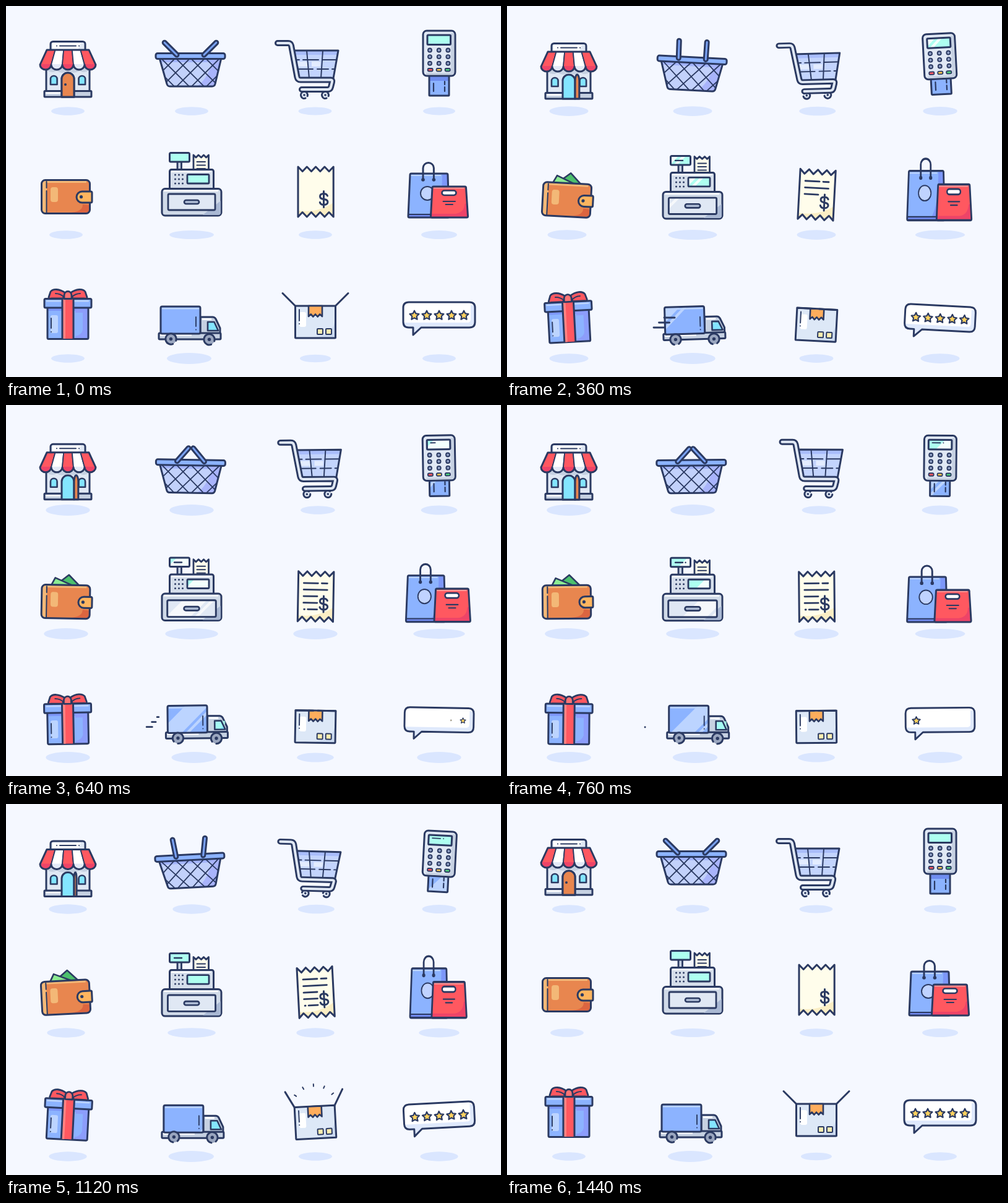
An HTML page with a canvas for the animation above (1480 ms loop, 800 by 600 pixels).

```html
<!DOCTYPE html>
<html lang="en">
<head>
<meta charset="utf-8">
<title>Shopping icons</title>
<style>
html, body { margin: 0; width: 100%; height: 100%; overflow: hidden; background: #f5f8ff; }
canvas { display: block; }
</style>
</head>
<body>
<canvas id="stage" width="800" height="600"></canvas>
<script>
const c = document.getElementById('stage').getContext('2d');
const LOOP = 1480, STEP = 40, CYCLE = 1440;
const INK = '#2b3a62', BLUE = '#8cb3ff', DEEP = '#7d97f8', PALE = '#bcd4ff', RED = '#ff5860',
  ROSE = '#ee4468', GREY = '#e0e8f4', STEEL = '#c6d1e2', MINT = '#aefff0', CYAN = '#84e5ff',
  ORANGE = '#e8864f', TAN = '#f3b877', CREAM = '#fffdeb', WHITE = '#ffffff';

let t = 0, u = 0, s = 0; // time, float 0..1..0, sway -1..1

const ease = k => (1 - Math.cos(Math.PI * Math.min(1, Math.max(0, k)))) / 2;

// Eased value from a flat list: time, value, time, value...
function key(list, at = t) {
  for (let i = 0; i < list.length - 2; i += 2) {
    if (at < list[i + 2]) {
      return list[i + 1] + (list[i + 3] - list[i + 1]) * ease((at - list[i]) / (list[i + 2] - list[i]));
    }
  }
  return list[list.length - 1];
}

function paint(path, fill, width = 3) {
  if (fill) { c.fillStyle = fill; c.fill(path); }
  if (width) { c.lineWidth = width; c.strokeStyle = INK; c.stroke(path); }
}
const shape = (d, fill, width) => paint(new Path2D(d), fill, width);

function box(x, y, w, h, r, fill, width) {
  const p = new Path2D();
  p.roundRect(x, y, w, h, r);
  paint(p, fill, width);
}

function dot(x, y, r, fill = INK, width = 0) {
  const p = new Path2D();
  p.arc(x, y, r, 0, 7);
  paint(p, fill, width);
}

function pose(x, y, dx, dy, degrees, draw, sx = 1, sy = sx) {
  c.save();
  c.translate(x + dx, y + dy);
  c.rotate(degrees * Math.PI / 180);
  c.scale(sx, sy);
  c.translate(-x, -y);
  draw();
  c.restore();
}

function clipped(d, draw) {
  c.save();
  c.clip(new Path2D(d));
  draw();
  c.restore();
}

function shadow(x, y, w, h) {
  c.fillStyle = '#dae6ff';
  c.beginPath();
  c.ellipse(x, y, w / 2, h / 2, 0, 0, 7);
  c.fill();
}

const softShadow = (x, y) => shadow(x, y, 54 + 18 * u, 13.5 + 4.5 * u);

// Slanted light passing over a rectangle
function sheen(x, y, w, h, lead, color) {
  clipped(`M${x} ${y}h${w}v${h}h${-w}z`, () => {
    for (const [a, b] of [[-38, 0], [6, 12]]) {
      shape(`M${x + lead + a} ${y}H${x + lead + b}l${-h} ${h}h${a - b}z`, color, 0);
    }
  });
}

function tube(d, fill, outer) {
  const p = new Path2D(d);
  paint(p, null, outer);
  c.strokeStyle = fill;
  c.lineWidth = outer - 6;
  c.stroke(p);
}

function wheel(x, y, r, fill, spin, hub) {
  dot(x, y, r, fill);
  const p = new Path2D();
  p.arc(x, y, r, spin + 1.2, spin + 6.6);
  paint(p);
  dot(x, y, hub);
}

function store() {
  softShadow(100, 170);
  pose(100, 100, 0, 6 * u, 0, () => {
    box(72, 57.5, 56, 16, 4, GREY);
    shape('M75 60H121L117 69H75z', WHITE, 0);
    shape('M82 64.5h.1M87 64.5H113M118 64.5h.1', null, 2);
    shape('M65 92H135V138H65z', GREY);
    shape('M66.500 96H133.500V104Q127 110 119 105Q109 111 100 105Q91 111 82 105Q73 110 66.500 104z', STEEL, 0);
    box(62, 137.5, 76, 9.5, 1, STEEL);
    shape('M64 139.500H90V142H64z', WHITE, 0);
    for (const x of [72, 117.5]) shape(`M${x} 127v-9a5.300 5 0 0 1 10.600 0v9z`, CYAN, 2.6);
    const arch = (x, w, fill) => shape(`M${x} 147V118a${w / 2} 10 0 0 1 ${w} 0V147z`, fill);
    arch(90, 20, CYAN);
    const w = 20 * Math.cos(key([0, 0, 300, 110, 1060, 110, 1400, 0]) * Math.PI / 180);
    arch(Math.min(110, 110 - w), Math.abs(w), ORANGE);
    if (w > 14) dot(116 - w, 127, 2);
    for (let i = 0; i < 5; i++) {
      const top = 66 + 13.6 * i, low = 55 + 18 * i;
      const stripe = `M${top} 71L${low} 95a9 8 0 0 0 18 0L${top + 13.6} 71z`;
      shape(stripe, i % 2 ? WHITE : RED, 0);
      clipped(stripe, () => shape(`M${low} 94h18v12h-18z`, i % 2 ? '#e3eaf7' : ROSE, 0));
      shape(stripe, null, 1.8);
    }
    shape('M66 71H134L145 95' + 'a9 8 0 0 1 -18 0'.repeat(5) + 'z');
  });
}

function basket() {
  softShadow(300, 170);
  const tilt = -45 + 88 * u;
  pose(298, 103, 0, 12.5 * u, 3 * s, () => {
    const body = 'M248 84H348L338 126Q337 130 333 130H265Q261 130 260 126z';
    shape(body, '#c2d1fb', 0);
    clipped(body, () => {
      shape('M240 80H356V91H240z', '#a3b4fb', 0);
      shape('M334 84H350L336 132H306Q328 118 334 84z', '#a9b4fb', 0);
      for (let x = 202; x < 400; x += 24) shape(`M${x} 84l48 48M${x} 84l-48 48`, null, 1.8);
    });
    shape(body);
    box(242, 76.5, 112, 9, 3, BLUE);
    for (const side of [-1, 1]) {
      pose(298 + 22 * side, 79, 0, 0, -side * tilt, () => tube(`M${298 + 22 * side} 79v-28`, '#7ba3f6', 9));
    }
  });
}

function cart() {
  const swing = Math.abs(s), dx = 5.2 * u, dip = s * s;
  shadow(499.5 + 4.5 * u, 170, 54 + 5 * swing, 13 + 1.5 * swing);
  pose(490, 140, dx * .85, .6 * swing, -1.5 * s, () => {
    wheel(482, 144, 5.5, GREY, dx, 1.8);
    wheel(516, 144, 5.5, GREY, dx, 1.8);
  });
  pose(500, 140, dx, 2.2 * dip, -1.6 * s, () => {
    const body = 'M463 72H537L529 117H471z';
    shape(body, '#c3d4fd', 0);
    clipped(body, () => {
      shape('M463 72H537V79H463z', '#a9bdfb', 0);
      shape('M470 90h18v8h-18zM494 90h14v8h-14z', '#e3ecff', 0);
      shape('M460 87H474M480 87H505M511 87H540M460 102H496M503 102H521M527 102H540', null, 2);
      shape('M486 72L490 117M512 72L509 117', null, 2);
    });
    shape(body);
    const grip = 60 - 3 * dip;
    tube(`M439 ${grip}H456Q460 ${grip} 461 ${grip + 4}L470.5 115Q471.5 119.5 476 119.5H525Q528 119.5 527 123L525 131Q524 135 520 135H478`, GREY, 10);
  }, 1, 1 - .04 * dip);
}

function terminal() {
  shadow(700, 170, 52 + 7 * u, 13 + 2 * u);
  const slide = key([0, 0, 280, 7, 1120, 7, 1420, 0]);
  pose(700, 92, 0, 9.5 * u, -3 * s, () => {
    pose(700, 130, 0, -slide, 0, () => {
      shape('M684 100H716V145H684z', BLUE, 0);
      shape('M684 112H716V121H684z', '#6f8df0', 0);
      sheen(684, 110, 32, 35, (t - 560) * .125, PALE);
      box(684, 100, 32, 45, 1);
      shape('M691 125V138M709 122V127M709 131V138', null, 2.2);
    });
    box(674, 40, 52, 73, 6, GREY);
    shape('M719 44H724V108Q724 111 720 111H679V108H716Q719 108 719 104z', STEEL, 0);
    shape('M681 47H718.500V62.500H681z', MINT, 0);
    sheen(681, 47, 37.5, 15.5, (t - 260) * .13, 'rgba(255,255,255,.85)');
    box(681, 47, 37.5, 15.5, 1.5);
    const typed = key([560, 0, 740, 18, 1140, 18, 1340, 0]);
    if (typed > 1) shape(`M687 51.800h${Math.min(13, typed)}${typed > 17 ? 'M705 51.800h.1' : ''}`, null, 1.8);
    for (let i = 0; i < 9; i++) dot(685 + 14.7 * (i % 3), 71.5 + 10.6 * Math.floor(i / 3), 3, '#8f9fc4', 1.9);
    [RED, '#ffc94f', '#4fcf7c'].forEach((f, i) => box(681.7 + 14 * i, 101, 8, 4.5, 1.5, f, 1.9));
  });
}

function wallet() {
  softShadow(97, 370);
  const rise = key([0, 0, 300, 20, 1120, 20, 1420, 0]);
  pose(97, 309, 0, 10 * u, 3 * s, () => {
    if (rise > 1) pose(97, 300, 0, 21 - rise, 0, () => {
      shape('M86 276L101 264L121 284L115 300H90z', '#4cc06d', 2.6);
      shape('M68 290L79 269L119 286L112 300H70z', '#8ceb92', 2.6);
    });
    box(57.5, 281.5, 78, 54, 6, ORANGE, 0);
    shape('M134 322V331Q134 334 131 334H100Q124 334 124 321z', '#dc6540', 0);
    box(58, 282, 8, 53, 4, TAN, 0);
    shape('M64 283H130V286H64z', TAN, 0);
    box(72, 293, 12, 24, 4, TAN, 0);
    shape('M65.500 284V294M65.500 299V334', null, 2);
    box(57.5, 281.5, 78, 54, 6);
    const x = 114 + 3 * u;
    box(x, 300, 139 - x, 18, [9, 2, 2, 9], '#fdb55f');
    dot(x + 7.5, 308.7, 2.6);
  });
}

function register() {
  shadow(300, 370, 72 + 14 * u, 14 + 4 * u);
  const lead = (t - 260) * .13, glow = 'rgba(255,255,255,.85)';
  pose(300, 290, 0, 9.8 * u, 0, () => {
    const top = 265 - 24 - 2.5 * s;
    clipped('M295 230H340V264H295z', () => {
      shape(`M303 270V${top}l4 4 4 -4 4.500 4 4 -4 4 4 4 -4V270z`, CREAM, 2.8);
      shape([11, 16.5, 22].map(d => `M308.500 ${top + d}H322`).join(''), null, 2);
    });
    box(277, 250, 6.5, 16, 0, STEEL, 2.8);
    box(264.5, 237.5, 32, 14.5, 2, MINT, 0);
    sheen(264.5, 237.5, 32, 14.5, lead, glow);
    box(264.5, 237.5, 32, 14.5, 2);
    const typed = key([160, 0, 340, 12, 560, 12, 740, 18, 960, 12, 1140, 12, 1340, 0]);
    if (typed > 1) shape(`M272 245h${Math.min(12, typed)}${typed > 15 ? 'M288.500 245h.1' : ''}`, null, 2.4);
    box(264.5, 264.5, 71, 34, 3, '#d5deeb');
    shape('M267 267H331V269H267z', WHITE, 0);
    for (let i = 0; i < 9; i++) dot(273.5 + 6 * (i % 3), 273 + 7 * Math.floor(i / 3), 1.5);
    box(293, 272.5, 35, 14.5, 1.5, MINT, 0);
    sheen(293, 272.5, 35, 14.5, lead, glow);
    box(293, 272.5, 35, 14.5, 1.5, null, 2.8);
    box(252, 295.5, 96, 43.5, 5, '#d0dae8');
    shape('M347 315V334Q347 338 343 338H318z', '#a9b8d3', 0);
    shape('M255 298H343V300H255z', WHITE, 0);
    // The drawer slides towards the viewer
    pose(300, 317, 0, 2.8 * u, 0, () => {
      box(262, 304, 76, 26, 2, GREY, 0);
      sheen(262, 304, 76, 26, (t - 330) * .2, 'rgba(255,255,255,.7)');
      box(262, 304, 76, 26, 2, null, 2.8);
      box(288, 314, 24, 6, 3, '#aebcd5', 2.6);
    }, 1 + .035 * u);
  });
}

function receipt() {
  softShadow(500, 370);
  const rows = [[[481, 504], [510, 519]], [[481, 519]], [[481, 503]], [[481, 503]], [[482, 483], [488, 503]]];
  const written = t < 1160 ? (t - 140) / 84 : 5 * (1 - (t - 1160) / 240);
  pose(500.5, 300, 0, 9.5 * u, 3 * s, () => {
    const zig = 'l7.200 7.500 7.100 -7.500'.repeat(4);
    const zag = 'l-7.200 -7.500 -7.100 7.500'.repeat(4);
    const paper = `M472 260${zig}V341${zag}z`;
    shape(paper, CREAM, 0);
    clipped(paper, () => shape('M472 331Q505 335 529 318V342H472z', '#fbeec4', 0));
    shape(paper);
    rows.forEach((row, i) => {
      const end = 481 + 38 * (written - i);
      for (const [a, b] of row) if (end > a) shape(`M${a} ${279 + 10.6 * i}H${Math.min(b, end)}`, null, 2.8);
    });
    shape('M519.500 307C518.500 304.500 516.500 303.500 513.500 303.500C510 303.500 507.500 305 507.500 308C507.500 315 520 310 520 317C520 320 517 321.500 513.500 321.500C510 321.500 508 320 507.300 317.500M513.500 299.500V325.500', null, 3);
  });
}

function bags() {
  const stretch = Math.min(1, 1.3 * Math.abs(s)), base = 342 + 9 * u;
  const apart = key([0, 0, 360, 6, 520, 5.5, 760, 4, 960, -.5, CYCLE, 0]);
  shadow(700, 370, key([0, 58, 480, 84, 560, 84, CYCLE, 58]), 14 + 2 * u);
  pose(0, 0, 683 - apart, base, 0, () => {
    const bag = 'M-28 -71H29Q31 -71 31 -69L33 -2Q33 0 31 0H-31Q-33 0 -33 -2L-30 -69Q-30 -71 -28 -71z';
    shape(bag, BLUE, 0);
    clipped(bag, () => {
      shape('M4 0Q22 -10 22 -71H34V0z', DEEP, 0);
      shape('M-34 -5H34V1H-34z', '#7089ee', 0);
      shape('M-29 -69H20V-67H-29z', PALE, 0);
      shape('M-33 -5H33', null, 1.8);
    });
    shape(bag);
    dot(-2, -39, 11, '#c0d3ff', 1.9);
    shape('M-9 -61V-80a8.700 8.500 0 0 1 17.400 0V-61');
    dot(-9, -61, 2.8);
    dot(8.4, -61, 2.8);
  }, 1 - .08 * stretch, 1 + .125 * stretch);
  pose(0, 0, 716.5 + apart, base, 0, () => {
    const bag = 'M-25.500 -50H25Q27 -50 27 -48L30 -2Q30 0 28 0H-28Q-30 0 -30 -2L-27.500 -48Q-27.500 -50 -25.500 -50z';
    shape(bag, RED, 0);
    clipped(bag, () => {
      shape('M-30 -6H10Q24 -8 25 -22L32 -24V0H-30z', ROSE, 0);
      shape('M-26 -48.500H24V-46.500H-26z', '#ff9a98', 0);
    });
    shape(bag);
    box(-12, -43.5, 23, 7.5, 3.7, WHITE, 2.6);
    shape('M-10 -26H9.500M-6 -21H5.500', null, 1.9);
  }, 1 - .06 * stretch, 1 + .16 * stretch);
}

function gift() {
  softShadow(100, 570);
  pose(100, 503, 0, 10 * u, -3 * s, () => {
    shape('M67 487H133V538.500H67z', BLUE, 0);
    shape('M68 488H132V493H68z', DEEP, 0);
    shape('M112 538V490H132V538z', '#8c9dfb', 0);
    shape('M112 496H124V524Q122 532 112 534z', BLUE, 0);
    box(72, 500, 12, 29, 3, PALE, 0);
    box(67, 487, 66, 51.5, 2);
    shape('M73 505V521M73 527h.1', null, 1.9);
    box(62, 473.5, 76, 14.5, 2, BLUE);
    shape('M65 476H134V478.500H65z', PALE, 0);
    shape('M91 474H109V538H91z', RED, 0);
    shape('M91 474H96V538H91z', '#ff8583', 0);
    shape('M91 474V538M109 474V538');
    for (const side of [1, -1]) {
      pose(100, 466, 0, 0, 0, () => {
        shape('M96 464C86 457 76 457 72 462L69 471Q69 474 73 473H92z', RED, 2.8);
        shape('M80 465Q88 465 94 471', null, 2);
      }, side, 1);
    }
    shape('M94 473.500V468a6 6.500 0 0 1 12 0V473.500z', '#ff7474', 2.8);
  });
}

function truck() {
  const dx = 11.8 * u, lean = Math.max(0, s), sink = 1.3 * Math.max(0, -s);
  shadow(296 + 8 * u, 570, 72 + 1.5 * Math.abs(s), 18);
  pose(297, 535, dx, sink, -1.7 * lean, () => {
    shape('M314 503H334Q337 503 339 506L346 521V538H314z', STEEL);
    shape('M317 505H332V508H317z', WHITE, 0);
    shape('M326 511H336.500L343 525H326z', CYAN, 0);
    sheen(326, 511, 17, 14, (t - 420) * .1, 'rgba(174,255,240,.8)');
    shape('M326 511H336.500L343 525H326z', null, 2.6);
    box(247, 529, 100, 10, 1.5, STEEL);
    shape('M249 531H300V533.500H249z', WHITE, 0);
    box(250, 486, 64, 44, 2.5, BLUE, 0);
    shape('M252 488H312V490.500H252z', PALE, 0);
    sheen(250, 486, 64, 44, (t - 195) * .15, PALE);
    box(250, 486, 64, 44, 2.5);
    shape('M307 503V518M307 523.500h.1', null, 1.9);
  });
  pose(297, 535, dx, 0, -1.7 * lean, () => {
    wheel(266.5, 538.5, 8.7, '#9aa6bf', dx / 9, 2.7);
    wheel(328.5, 539.3, 8.7, '#9aa6bf', dx / 9, 2.7);
  });
  for (let i = 0; i < 3; i++) {
    const length = key([160, 0, 340, 17, 520, 17, 680 + 45 * i, 0]);
    const x = 254 - 8.5 * i - (t - 360) * .035;
    if (t > 160 && t < 730 + 25 * i) shape(`M${x} ${505 + 8 * i - lean}h${length + .1}`, null, 2.8);
  }
}

function parcel() {
  shadow(500, 570, 50 + 10 * u, 12.5 + 2.5 * u);
  const flap = key([0, -45, 320, 90, 780, 90, 1220, -45]);
  pose(500, 511, 0, 9.5 * u, 3 * s, () => {
    shape('M467.500 485H532.500V537H467.500z', '#dde8f7', 0);
    shape('M531 512V536H490Q526 536 531 512z', '#cbdaf0', 0);
    box(474, 495, 11, 24, 3, WHITE, 0);
    box(467.5, 485, 65, 52, 1);
    shape('M474 491V509M474 514h.1', null, 1.9);
    shape('M489 485V502l3.700 -3.500 3.700 4 3.600 -4 3.600 4 3.700 -4 3.700 3.500V485z', '#ffad5c', 2.6);
    for (const x of [503, 517]) box(x, 522, 9, 9, 1, '#ffeeb0', 2);
    for (const side of [-1, 1]) {
      const x = 500 + 32.5 * side;
      pose(x, 485, 0, 0, -side * flap, () => shape(`M${x} 485v-29`));
    }
    const out = key([1000, 24, 1180, 44]), back = key([1000, 24, 1220, 44]);
    if (out - back > .6) {
      for (let i = -2; i <= 2; i++) {
        pose(500, 488, 0, 0, 27 * i, () => shape(`M500 ${488 - out}V${488 - back}`, null, 2));
      }
    }
  });
}

function review() {
  softShadow(700, 570);
  pose(700, 499.5, 0, 10 * u, 3 * s, () => {
    const bubble = 'M651 479H749Q758 479 758 488V511Q758 520 749 520H671L658 532V520H651Q642 520 642 511V488Q642 479 651 479z';
    shape(bubble, WHITE, 0);
    clipped(bubble, () => shape('M642 512H746Q751 512 751 506V484H759V534H642z', '#dfe9fc', 0));
    shape(bubble);
    for (let i = 0; i < 5; i++) {
      const born = 705 + 64 * i, gone = 490 + 28 * i;
      const size = key([gone, 1, gone + 90, 0, born, 0, born + 78, 1.1, born + 240, 1]);
      if (size < .05) continue;
      const x = 660 + 20 * i;
      let star = '';
      for (let k = 0; k < 10; k++) {
        const r = k % 2 ? 3.9 : 7.8, a = k * Math.PI / 5;
        star += `${k ? 'L' : 'M'}${x + r * Math.sin(a)} ${500.5 - r * Math.cos(a)}`;
      }
      pose(x, 500, 0, 0, 0, () => shape(star + 'z', '#ffd25e', 2.2), size);
    }
  }, 1 - .038 * u, 1 - .045 * u);
}

const icons = [store, basket, cart, terminal, wallet, register, receipt, bags, gift, truck, parcel, review];

function frame() {
  t = Math.floor((performance.now() % LOOP) / STEP) * STEP;
  const phase = 2 * Math.PI * t / CYCLE;
  u = (1 - Math.cos(phase)) / 2;
  s = Math.sin(phase);
  c.fillStyle = '#f5f8ff';
  c.fillRect(0, 0, 800, 600);
  c.lineCap = c.lineJoin = 'round';
  icons.forEach(draw => draw());
  requestAnimationFrame(frame);
}
frame();
</script>
</body>
</html>
```
